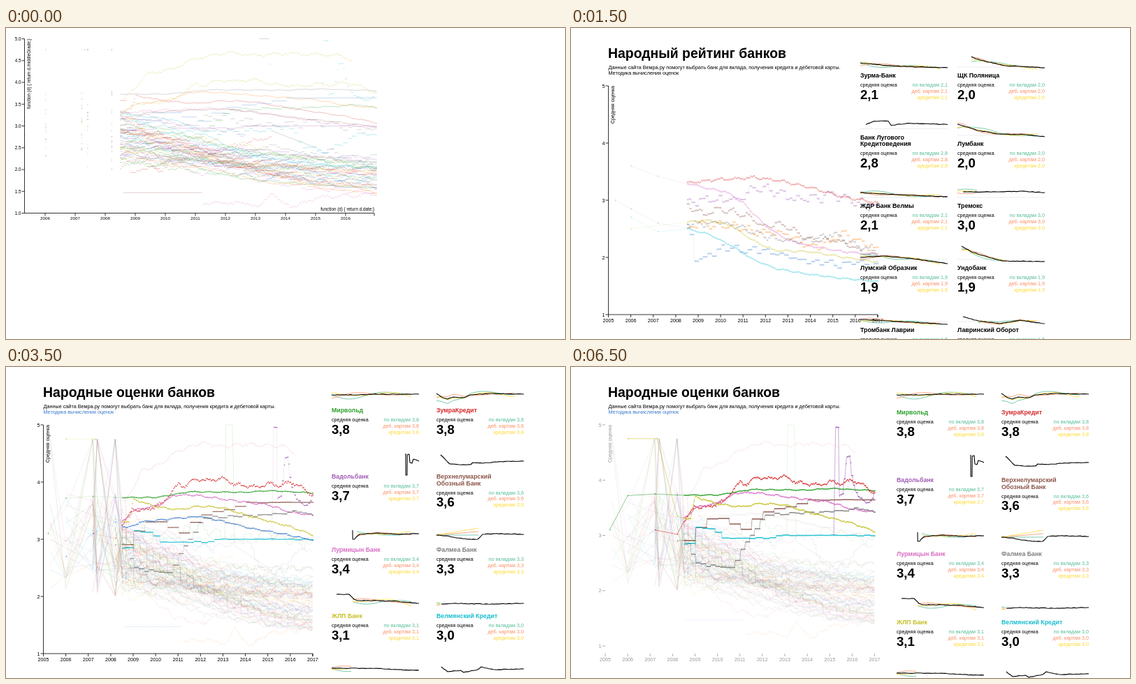
An HTML page for the animation above (9.5 s loop, 800 by 446 pixels).

```html
<!DOCTYPE html>
<html lang="ru">
<head>
<meta charset="utf-8">
<title>Рейтинг банков</title>
<style>
html, body { margin: 0; width: 100%; height: 100%; overflow: hidden; background: #fff; }
svg { display: block; width: 100vw; height: 100vh; font-family: "Liberation Sans", Arial, sans-serif; }
path { fill: none; stroke-linejoin: round; }
</style>
</head>
<body>
<svg id="stage" viewBox="0 0 800 446"></svg>
<script>
const stage = document.getElementById('stage');
const COLORS = ['#2ca02c', '#d62728', '#a05cb4', '#8c564b', '#d86cc4', '#7f7f7f', '#c4c024', '#17becf', '#3f7fd0', '#ff7f0e'];
const TRIO = ['#55bd97', '#fc8d62', '#ffd92f'];
const LOUD = ['#e8604c', '#6a7fe0', '#f2c230'];

const rng = seed => () => (seed = seed * 16807 % 2147483647) / 2147483647;
const hash = (a, b) => { const s = Math.sin(a * 91.7 + b * 37.3) * 43758.5; return s - Math.floor(s) - .5; };
const points = s => s.split(' ').map(p => p.split(',').map(Number));
const fix = n => n.toFixed(1);

function lerp(pts, x) {
  let i = 1;
  while (i < pts.length - 1 && pts[i][0] < x) i++;
  const [a, b] = [pts[i - 1], pts[i]];
  const k = Math.max(0, Math.min(1, (x - a[0]) / (b[0] - a[0] || 1)));
  return a[1] + (b[1] - a[1]) * k;
}

// Years count from 2000; hold keeps a grade for that part of a year.
function series(pts, seed, hold, jitter) {
  const early = pts.filter(p => p[0] < 8.4), late = [];
  const end = pts[pts.length - 1][0];
  for (let t = Math.max(8.5, pts[0][0]); t <= end; t += 1 / 24) {
    const q = hold ? Math.max(pts[0][0], Math.floor(t / hold) * hold) : t;
    const v = lerp(pts, q) + jitter * (hash(q, seed) + .6 * Math.sin(q * 9 + seed));
    late.push([t, Math.max(1, Math.min(5, v))]);
  }
  return { early, late };
}

const leaders = [
  ['5.2,3.1 6,3.72 7.2,3.75 8.2,3.73 9.2,3.73 10,3.73 11.5,3.83 14,3.82 15,3.85 16,3.83 17,3.81', 0, .01],
  ['7.2,3.1 8.2,3.02 8.5,3.25 9,3.54 9.5,3.5 10.3,3.63 11,3.96 11.3,3.93 11.8,4.06 12.2,4.02 13,4.06 13.5,3.96 14.5,3.91 15,3.97 15.5,3.93 16,4 16.4,3.93 17,3.77', 0, .04],
  ['15.18,3 15.2,5 15.34,5 15.38,3.75 15.55,3.75 15.7,4.35 15.85,4.46 16,3.95 16.25,3.68 16.6,3.6 17,3.75', .07, .05],
  ['8.5,2.9 8.9,2.9 9,3.15 9.3,3.3 10.4,3.3 10.6,3.12 11.2,3.12 11.6,3.35 12.3,3.48 13.2,3.53 14,3.64 17,3.65', .5, .01],
  ['8.5,3.3 9,3.5 9.6,3.55 10.2,3.6 10.8,3.77 11.8,3.77 13,3.7 14,3.65 15,3.6 16,3.47 17,3.42', 0, .02],
  ['8.2,2.9 8.6,2.85 9,2.5 9.4,2.47 10.6,2.4 11,2.75 11.6,3.1 12,3.36 13,3.4 15,3.43 16.3,3.48 17,3.41', .22, .03],
  ['6,4.75 7.3,4.75 8.2,3.35 8.8,3.3 9,3.7 10,3.57 11,3.52 12,3.58 13,3.55 14,3.42 15,3.32 16,3.22 17,3.07', 0, .02],
  ['8.5,2.85 8.8,2.85 9,3.15 9.8,3.1 10.2,2.95 12.3,2.95 12.6,3 17,3', .3, .01],
  ['6,2.7 7.2,3.1 8.2,3.3 8.6,3.2 9.3,3.3 10.5,3.35 11.9,3.4 12.7,3.33 13.3,3.28 14,3.2 15.5,3.1 17,2.98', .12, .015]
].map((c, i) => series(points(c[0]), i + 3, c[1], c[2]));

const middles = [
  ['8.5,3.3 9.5,3.35 11.5,3.4 12.5,3.35 14,3.22 15.5,3.05 17,2.95', 0, .03],
  ['8.5,2.95 9,3.02 10.5,3 11.2,3.15 12,3.2 13.5,3 15,3.1 16,2.95 17,2.9', .15, .1],
  ['8.5,2.9 9.2,2.75 10,2.85 11,2.75 11.8,2.55 12.6,2.6 14,2.3 15,2.3 17,2.0', .1, .06],
  ['6,3.6 7.2,3.42 8.5,3.3 9.5,3.2 10.2,3.15 11,2.95 12,2.55 13,2.3 14,2.2 15.5,2.1 17,2.05', 0, .02],
  ['5.3,3 6,2.85 7.2,2.6 8.5,2.57 10,2.62 11,2.5 12,2.36 13,2.28 14.3,2.34 15,2.42 15.7,2.25 17,2.1', .1, .06],
  ['6,2.5 8.5,2.62 9.5,2.65 10.5,2.55 11.4,2.3 12.4,2.12 14,2.1 15.5,2 17,1.92', 0, .02],
  ['6,2.7 7.2,2.45 8.5,2.5 9.5,2.4 10.5,2.2 11.5,1.95 12.5,1.8 14,1.7 15.5,1.63 17,1.58', 0, .015],
  ['8.5,2.5 8.8,2 9.2,2 10,2.15 11,2.12 12.5,2.1 13.3,1.95 14.5,1.9 17,1.88', .2, .08],
  ['8.5,2.55 9.5,2.58 10.5,2.56 11.5,2.45 13,2.4 14,2.15 15.5,2.4 16.2,2.25 17,2.12', .13, .08]
].map((c, i) => series(points(c[0]), i + 31, c[1], c[2]));

const oddities = [
  ['8.6,1.47 11.2,1.47', 0, 0],
  ['11.25,1.23 12.8,1.23 13.1,1.1 13.5,1.5 13.8,1.25 14.3,1.15 15,1.35 16,1.4 17,1.43', 0, .05],
  ['12.5,3 13.1,3 13.12,5 13.45,5 13.48,2.9 15,2.5', 0, 0],
  ['8.6,3.6 9.4,4.2 10.2,4.3 11,4.55 12,4.68 13,4.62 14,4.66 15.8,4.62 16.2,4.5', 0, .04],
  ['8.5,2.8 10.5,2.85 12.8,2.88 14,3 14.6,2.5 15.3,2.4 16.4,2.85 17,2.78', .15, .06],
  ['8.5,2.6 10,2.5 11,2.3 12,2 13.4,1.7 13.8,2.1 14.2,2.1 15,1.9 17,1.85', .1, .08],
  ['8.5,2.5 9.3,2.25 10.2,2.08 11.3,2.05 12.5,1.85 13.5,1.68 15,1.65 16.3,1.62 17,1.45', 0, .02]
].map((c, i) => series(points(c[0]), i + 71, c[1], c[2]));

function crowd(i) {
  const r = rng(i * 7919 + 131);
  r(); r();
  const pts = [5.3, 6, 7.2, 7.4, 8.2].slice(Math.floor(r() * 7))
    .map(t => [t, r() < .14 ? 4.75 : 2 + r() * 1.8]);
  const a = 2.15 + r() * 1.15, b = 1.4 + r() * .85 + (r() < .15 ? .6 : 0);
  const end = r() < .22 ? 10 + r() * 6 : 17;
  const shaky = r() < .25 ? 1 : .3;
  for (const t of [8.5, 9.1, 9.8, 10.8, 12, 13.5, 15, 17]) {
    const k = (t - 8.5) / 8.5;
    pts.push([Math.min(t, end), a + (b - a) * Math.sin(k * 1.57) + (r() - .5) * shaky * (1 - k)]);
    if (t > end) break;
  }
  return series(pts, i, [0, 0, .12, .3][Math.floor(r() * 4)], .03 + .05 * r());
}
const everyone = [...leaders, ...middles, ...oddities, ...Array.from({ length: 72 }, (_, i) => crowd(i))];

const path = (d, color, w, op = 1) => `<path d="${d}" stroke="${color}" stroke-width="${w}" opacity="${op}"/>`;
// y is the middle of the capitals.
const text = (x, y, size, str, more = '') => `<text x="${x}" y="${fix(y + size * .36)}" font-size="${size}" ${more}>${str}</text>`;
const BOLD = 'font-weight="700"', END = 'text-anchor="end"', MID = 'text-anchor="middle"';

const oldPlot = { x: 13, dx: 43, y: 265.5, dy: 62.5, left: 26.5, right: 527, top: 15.5, from: 6, to: 16, step: .5, size: 6.3, foot: 272.5, title: 'function (d) { return d.middleGrade;}', under: 'function (d) { return d.date;}' };
const wide = { ...oldPlot, x: 71.5, dx: 30.62, y: 411, dy: 82, left: 53.5, right: 439, top: 83, from: 5, to: 17, size: 7.2, foot: 419 };
const plain = { ...wide, x: 53.5, dx: 32.12, step: 1, title: 'Средняя оценка', under: '' };
const pale = { ...plain, y: 400, dy: 79.25, ink: '#999' };
const shifted = { ...pale, x: 49, left: 49, right: 434.5 };

function axes(p) {
  const ink = p.ink || '#000', fill = `fill="${ink}"`;
  let out = '', d = '';
  for (let v = 1; v <= 5; v += p.step) {
    const y = p.y - (v - 1) * p.dy;
    d += `M${p.left} ${y}h-4`;
    out += text(p.left - (p.ink ? 5.5 : 5), y, p.size, p.step < 1 ? v.toFixed(1) : v, `${END} ${fill}`);
  }
  const base = p.ink ? 411 : p.y;
  for (let n = p.from; n <= p.to; n++) {
    const x = p.x + (n - 5) * p.dx;
    d += `M${fix(x)} ${base}v4`;
    out += text(fix(x), p.foot, p.size - .1, 2000 + n, `${MID} ${fill}`);
  }
  if (!p.ink) d += `M${p.left} ${p.top}V${p.y}H${p.right}v4`;
  out += path(d, ink, .8);
  out += `<text transform="translate(${p.left + (p.dy < 70 ? 8.3 : 8.5)} ${p.top}) rotate(-90)" font-size="${p.size}" ${END} ${fill}>${p.title}</text>`;
  if (p.under) out += text(p.right, p.y - 6, p.size, p.under, END);
  return out;
}

function trace(p, s, color, line, dash) {
  const at = ([t, v]) => [fix(p.x + (t - 5) * p.dx), fix(p.y - (v - 1) * p.dy)];
  let out = '';
  if (line) out += path('M' + [...s.early, ...s.late].map(at).join('L'), color, line[0], line[1]);
  if (dash) {
    const len = p.dx / 24 * .92;
    out += path([...s.early, ...s.late].map(q => `M${at(q)}h${fix(len)}`).join(''), color, dash[0], dash[1]);
  }
  return out;
}

// Review counts along the bottom and the thin posts above them.
function counts() {
  const r = rng(4242);
  let out = '';
  for (let i = 0; i < 34; i++) {
    const k = Math.pow(r(), 2.2), j = .6 + r() * .4;
    let d = `M81 410.5L102 ${fix(409 - 48 * k)}L139 ${fix(409 - 41 * k * j)}L145 410L167 ${fix(410 - 28 * k * j)}L168 410.5L178 ${fix(409 - 7 * j)}L180 410.5`;
    for (let x = 186; x < 439; x += 4) d += `L${x} ${fix(410.5 - r() * (1 + Math.max(0, x - 240) / 200 * 9 * (1 - k)))}`;
    out += path(d, '#000', .45, .75);
  }
  return out + path('M374.5 113V411M421 78V411M430 78V411M436 175V411', '#777', .8, .8);
}

const bank = (name, grade, black, range = [0, 115], amp = 4) => ({ name, grade, black: points(black), range, amp });
const rated = [
  bank('ТЖД-Банк', '16,4', '30,-11 38,-10 40,-4 55,-1 70,8 90,10 125,11', [70, 115], 2),
  bank('Велгормант Банк', '19,3', '22,3 24,-3 40,0 60,4 80,7 95,13 112,7 125,8', [22, 110]),
  bank('Лумбанк кредитные карты', '19,5', '0,-5 30,0 50,5 70,7 125,10'),
  bank('ЖРК Банк', '20,9', '0,0 20,-1 60,0 75,4 85,8 125,10', [0, 115], 6),
  bank('ВЩП Дариша Банк', '21,2', '30,11 42,12 43,6 46,9 55,10 125,11', [45, 72], 2),
  bank('Банк Ормалфит', '22,2', '0,0 20,3 60,6 90,8 125,11'),
  bank('Мелтромбанк', '22,5', '8,10 18,3 60,4 125,7', [10, 115]),
  bank('Кальмирестбанк', '22,7', '30,-15 40,-10 55,-3 85,-1 112,2 114,8 125,7', [0, 0]),
  bank('Лавринский Оборот', '24,4', '6,-2 30,2 32,7 60,5 125,6', [30, 115], 3),
  bank('Нуфи Банк', '24,8', '37,14 38,10 72,11 78,14 90,10 125,11', [78, 112], 3),
  bank('Вук Банк', '25,1', '0,4 125,8'),
  bank('Дормельгозбанк', '25,3', '0,4 125,8')
];
const large = [
  bank('Зурма-Банк', '2,1', '0,5 30,8 60,10 125,12'),
  bank('ЩК Поляница', '2,0', '20,-4 26,-1 45,4 70,9 125,12', [20, 115]),
  bank('Банк Лугового|Кредитоведения', '2,8', '8,5 20,0 40,0 44,6 70,3 125,5', [0, 0]),
  bank('Лумбанк', '2,0', '0,-5 30,4 60,9 100,10 125,13', [0, 115], 5),
  bank('ЖДР Банк Велмы', '2,1', '0,4 50,7 125,10'),
  bank('Тремокс', '3,0', '8,3 60,3 90,2 125,4', [0, 28]),
  bank('Лумский Образчик', '1,9', '0,8 30,6 70,9 125,17'),
  bank('Ундобанк', '1,9', '6,-8 20,0 45,8 65,13 125,14', [6, 70]),
  bank('Тромбанк Лаврии', '1,6', '0,8 40,10 125,15'),
  bank('Лавринский Оборот', '1,6', '8,4 30,10 60,14 90,9 125,14', [30, 115])
];
const best = [
  bank('Мирвольд', '3,8', '0,0 30,0 60,-1 125,-1', [0, 115], 6.5),
  bank('ЗумраКредит', '3,8', '0,-2 9,4 16,6 24,3 39,4 49,0 75,-2 125,-1', [0, 113], 6.5),
  bank('Вадольбанк', '3,7', '106,-11 106.2,20 108,20 108.2,-9 111,-10 112,2 115,3 117,-3 120,-2 125,0', [0, 0]),
  bank('Верхнелумарский|Обозный Банк', '3,6', '6,-9 19,4 32,5 49,5 52,2 67,3 84,1 125,0', [0, 0]),
  bank('Лурмицын Банк', '3,4', '30,-6 30.2,7 33,7 35,4 40,0 64,-2 94,0 125,-1', [36, 115], 5),
  bank('Фалмеа Банк', '3,3', '0,1 14,2 24,4 44,7 59,7 66,0 84,-1 125,0', [0, 60], -6),
  bank('ЖЛП Банк', '3,1', '7,-9 25,-9 32,-2 37,0 64,0 94,1 125,4', [30, 115], 7),
  bank('Велмянский Кредит', '3,0', '7,5 24,4 74,5 125,4', [0, 6], 3),
  bank('Тремокс', '3,0', '0,-1 64,-1 94,1 125,2', [0, 29], 5),
  bank('Банк Орвета', '3,0', '7,-3 16,4 34,2 39,5 59,1 64,-3 84,1 125,0', [0, 0])
];

function spark(b, x, y, tints, seed) {
  const [from, to] = b.range;
  let out = '';
  if (to > from) tints.forEach((c, k) => {
    let d = '';
    for (let u = from; u <= to; u += 2) {
      const f = u / 14 + k * 2.1 + seed;
      const v = b.amp < 0 ? 1 - u / 60 * 5 * k
        : lerp(b.black, Math.max(u, from + 8)) + b.amp * Math.sin(f * (.8 + k * .15)) * (.6 + .4 * Math.cos(u / 40 + k));
      d += (d ? 'L' : 'M') + fix(x + u) + ' ' + fix(y + v);
    }
    out += path(d, c, .9, .85);
  });
  let d = '', prev = null;
  for (const [u, v] of b.black) {
    const n = prev ? Math.max(1, Math.round((u - prev[0]) / 3)) : 1;
    for (let i = 1; i <= n; i++) {
      const px = prev ? prev[0] + (u - prev[0]) * i / n : u;
      const py = prev ? prev[1] + (v - prev[1]) * i / n : v;
      d += (d ? 'L' : 'M') + fix(x + px) + ' ' + fix(y + py + (i < n ? hash(px, seed) * .8 : 0));
    }
    prev = [u, v];
  }
  return out + path(d, '#000', 1.1);
}

function ratingCards(dx, dy) {
  return rated.map((b, i) => {
    const x = (i % 2 ? 606 : 470) + dx, y = 6 + 86.3 * (i >> 1) + dy;
    return text(x, y, 8.8, b.name, BOLD) + path(`M${x} ${fix(y + 35)}h125`, '#d8dce6', .8)
      + spark(b, x, y + 20, LOUD, i) + text(x, y + 43, 7.2, 'Рейтинг') + text(x, y + 54, 14.6, b.grade, BOLD);
  }).join('');
}

function gradeCards({ list, cols, rows, gap, low, tinted }) {
  return list.map((b, i) => {
    const x = cols[i % 2], names = b.name.split('|'), extra = (names.length - 1) * 9.5;
    const first = rows[i >> 1] - (low ? extra : 0), last = first + extra;
    let out = '';
    if (low) out += path(`M${x} ${first - 12}h125`, '#e2e5ec', .7);
    out += spark(b, x, first - gap, TRIO, i);
    names.forEach((n, k) => out += text(x, first + k * 9.5, 8.8, n, `${BOLD} fill="${tinted ? COLORS[i] : '#000'}"`));
    out += text(x, last + 13.4, 7.2, 'средняя оценка') + text(x, last + 27, 18.6, b.grade, BOLD);
    ['по вкладам', 'деб. картам', 'кредитам'].forEach((s, k) =>
      out += text(x + 125, last + 13.4 + k * 8.9, 7.2, `${s} ${b.grade}`, `${END} fill="${TRIO[k]}"`));
    return out;
  }).join('');
}

const near = { list: large, cols: [414, 553], rows: [68, 166, 255, 344, 433], gap: 23, low: true };
const far = { ...near, cols: [467, 617] };
const tight = { list: best, cols: [466, 616], rows: [62, 157, 262, 357, 455], gap: 22, tinted: true };
const loose = { ...tight, rows: [65, 162, 268, 366, 465], gap: 25 };

// line, dash and top hold [width, opacity].
const faint = [.45, .28];
const states = [
  { p: oldPlot, dash: [.8, .42], shift: 5, n: 58 },
  { p: oldPlot, line: [.4, .2], dash: [.9, .35], shift: 5, rating: [60, 16] },
  { p: wide, line: [.4, .2], dash: [1.8, .24], shift: 7, rating: [0, 0], counts: true, head: 1 },
  { p: plain, set: middles, line: [.5, .2], dash: [2, .36], shift: 1, cards: near, head: 1 },
  { p: plain, dash: [1.8, .25], shift: 8, cards: far, head: 1 },
  { p: plain, line: [.4, .25], dash: [1.8, .27], shift: 8, cards: { ...far, list: best }, head: 1 },
  { p: plain, line: faint, dash: [1.2, .18], shift: 0, cards: tight, head: 1 },
  { p: plain, line: faint, top: [1.4, .9], cards: tight, head: 2 },
  { p: plain, line: faint, topLine: [.6, .6], top: [1.4, .9], cards: tight, head: 2 },
  { p: plain, line: faint, topLine: [.8, .75], top: [1.6, .9], cards: tight, head: 2 },
  { p: { ...plain, ink: '' }, line: [.45, .24], topLine: [.7, .65], top: [1.5, .95], cards: tight, head: 2 },
  { p: pale, line: [.45, .26], topLine: [.7, .65], top: [1.5, .95], cards: tight, head: 2 },
  { p: shifted, line: [.45, .24], topLine: [.7, .65], top: [1.5, .95], cards: tight, head: 2 },
  { p: shifted, line: [.45, .22], topLine: [.7, .65], top: [1.5, .95], cards: loose, head: 2, lead: 8 }
];

function heading(kind) {
  return text(53, 36, 19.4, kind < 2 ? 'Народный рейтинг банков' : 'Народные оценки банков', BOLD)
    + text(53.5, 56, 7.25, 'Данные сайта Вемра.ру помогут выбрать банк для вклада, получения кредита и дебетовой карты.')
    + text(53.5, 64.8, 7.25, 'Методика вычисления оценок', `fill="${kind < 2 ? '#000' : '#3a78c9'}"`);
}

function render(s) {
  let out = '';
  (s.set || everyone).slice(0, s.n).forEach((q, i) =>
    out += trace(s.p, q, COLORS[(i + (s.shift || 0)) % 10], s.line, s.dash));
  if (s.top) leaders.slice(0, s.lead).forEach((q, i) => out += trace(s.p, q, COLORS[i], s.topLine, s.top));
  if (s.counts) out += counts();
  out += axes(s.p);
  if (s.head) out += heading(s.head);
  if (s.rating) out += ratingCards(...s.rating);
  if (s.cards) out += gradeCards(s.cards);
  return out;
}

const pictures = states.map(render);
const start = performance.now();
let shown = -1;
function tick() {
  const i = Math.min(13, Math.floor((performance.now() - start) % 9500 / 500));
  if (i !== shown) stage.innerHTML = pictures[shown = i];
  requestAnimationFrame(tick);
}
tick();
</script>
</body>
</html>
```
